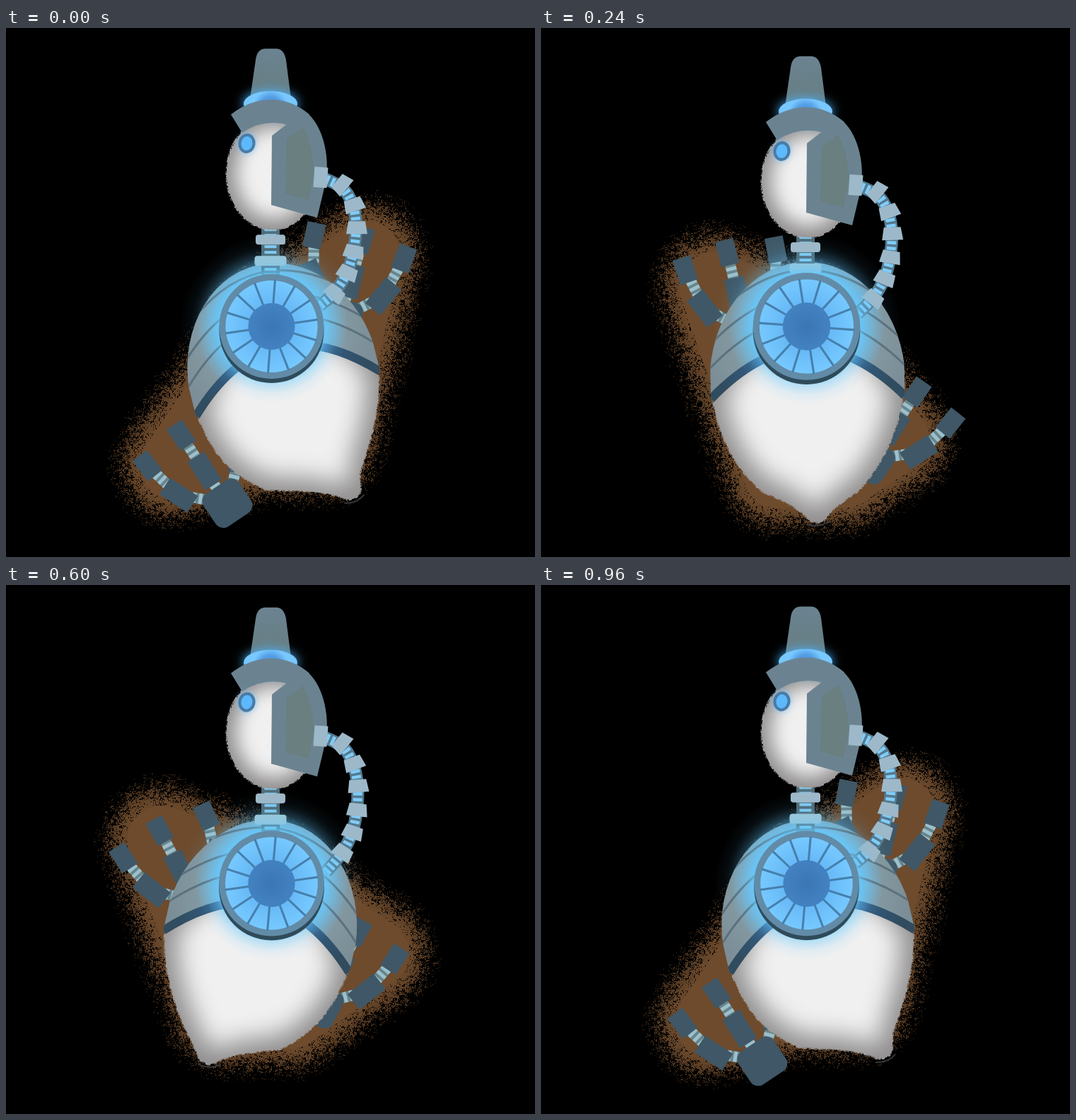
An HTML page with a canvas for the animation above (1000 ms loop, 748 by 748 pixels).

```html
<!DOCTYPE html>
<html>
<head>
<meta charset="utf-8">
<style>
  html, body { margin: 0; width: 100%; height: 100%; overflow: hidden; background: #000; }
  canvas { display: block; width: 100vw; height: 100vh; }
</style>
</head>
<body>
<canvas id="stage" width="748" height="748"></canvas>
<script>
const ctx = document.getElementById('stage').getContext('2d');
const LOOP = 1000, STEP = 40, RAD = Math.PI / 180, TAU = Math.PI * 2;
const STEEL = '#6b8391', PLATE = '#9db9c9', SLATE = '#3f5766', BROWN = [110, 75, 45];
const HUB = [375.5, 422];

// Keys: [time, ...values], smooth, periodic, without overshoot.
const bodyKeys = [          // tilt in degrees, tail offset
  [0, -13.7, 53], [160, -8.4, 36], [360, 10.5, -35], [520, 14.1, -53],
  [680, 9.5, -2], [800, -4.8, 27], [960, -13, 50]];
const clawKeys = [          // palm x, y, rotation
  [20, 472, 411, -18], [160, 479, 501, 0], [300, 450, 668, -1], [360, 438, 675, -2],
  [520, 437, 671, -1], [660, 449, 503, -14], [680, 451, 477, -17],
  [800, 463, 407, -22], [860, 468, 411, -22]];
const fuzzKeys = [          // right lobe x, y, left lobe x, y
  [0, 510, 322, 238, 618], [160, 492, 530, 248, 415], [360, 515, 622, 238, 328],
  [520, 512, 620, 240, 328], [680, 530, 390, 200, 430], [800, 510, 322, 232, 612],
  [960, 510, 322, 238, 618]];
const fingers = [           // block x, y, angle, tip x, y, angle
  [69, -10, 58, 114, -51, 39], [33, -45, 33, 67, -95, 35], [-16, -67, -5, 4, -123, 31]];
const tube = [              // x, y, sway x, sway y
  [445, 211, 0, 0], [475, 221, 0, 0], [492, 250, 0, 0], [496, 282, 2, 0],
  [492, 316, 5, 0], [483, 346, 8, 2], [465, 375, 12, 2], [443, 393, 10, 12]];

function sample(keys, t) {
  const n = keys.length;
  const key = i => {
    const k = keys[(i + n) % n].slice();
    k[0] += Math.floor(i / n) * LOOP;
    return k;
  };
  if (t < keys[0][0]) t += LOOP;
  let i = n - 1;
  while (keys[i][0] > t) i--;
  const [p, a, b, q] = [key(i - 1), key(i), key(i + 1), key(i + 2)];
  const d = b[0] - a[0], u = (t - a[0]) / d, v = 1 - u;
  const slope = (k, l, j) => (l[j] - k[j]) / (l[0] - k[0]);
  const blend = (m, n) => m * n > 0 ? 2 * m * n / (m + n) : 0;
  return a.slice(1).map((_, j) => {
    j++;
    const mid = slope(a, b, j);
    const ma = blend(slope(p, a, j), mid) * d, mb = blend(mid, slope(b, q, j)) * d;
    return a[j] * (1 + 2 * u) * v * v + ma * u * v * v + b[j] * u * u * (3 - 2 * u) - mb * u * u * v;
  });
}

// Noise tile, cut at several densities
const SIZE = 256;
let seed = 7;
const random = () => (seed = seed * 16807 % 2147483647) / 2147483647;
const noise = new Float32Array(SIZE * SIZE);
for (const cell of [4, 2, 1, 1]) {
  const w = SIZE / cell, grid = Array.from({ length: w * w }, random);
  for (let i = 0; i < noise.length; i++) {
    const x = i % SIZE / cell | 0, y = (i / SIZE | 0) / cell | 0;
    noise[i] += grid[y * w + x] / 4;
  }
}
function speckle(limit, rgb, shade = 1) {
  const c = document.createElement('canvas');
  c.width = c.height = SIZE;
  const g = c.getContext('2d'), img = g.createImageData(SIZE, SIZE);
  const color = rgb.map(v => v * shade);
  noise.forEach((v, i) => img.data.set([...color, v < limit ? 255 : 0], i * 4));
  g.putImageData(img, 0, 0);
  return ctx.createPattern(c, 'repeat');
}
const fuzz = Array.from({ length: 10 }, (_, i) => speckle(0.25 + 0.05 * i, BROWN, 0.5 + 0.05 * i));
const fluff = speckle(0.5, [165, 163, 162]);

function layer(draw) { ctx.save(); draw(); ctx.restore(); }
function fill(path, color) { ctx.fillStyle = color; ctx.fill(path); }
function line(path, color, width) { ctx.strokeStyle = color; ctx.lineWidth = width; ctx.stroke(path); }
function oval(x, y, rx, ry, turn = 0) {
  const p = new Path2D();
  p.ellipse(x, y, rx, ry, turn, 0, TAU);
  return p;
}
function block(x, y, w, h, turn, color, r = 0) {
  layer(() => {
    ctx.translate(x, y);
    ctx.rotate(turn);
    ctx.fillStyle = color;
    ctx.beginPath();
    ctx.roundRect(-w / 2, -h / 2, w, h, r);
    ctx.fill();
  });
}
function radial(x, y, r, ...stops) {
  const g = ctx.createRadialGradient(x, y, 0, x, y, r);
  stops.forEach(([at, color]) => g.addColorStop(at, color));
  return g;
}
// Soft white shape with grey rim
function puff(path, x, y, scale, blur) {
  line(path, fluff, 3);
  fill(path, '#908e8e');
  layer(() => {
    ctx.clip(path);
    ctx.filter = `blur(${blur}px)`;
    ctx.translate(x, y);
    ctx.scale(scale, scale);
    ctx.translate(-x, -y);
    fill(path, '#f0f0f0');
  });
}

function drawFuzz(t, tail) {
  const [rx, ry, lx, ly] = sample(fuzzKeys, t);
  const k = tail * 0.55, low = 640 - Math.abs(tail);
  const p = new Path2D(`M${lx} ${ly}L375 420L${rx} ${ry}L${420 + k} ${low}L${330 + k} ${low}Z`);
  ctx.lineJoin = 'round';
  fuzz.forEach((pattern, i) => line(p, pattern, 2 * (96 - 4.5 * i)));
  line(p, `rgb(${BROWN})`, 98);
  fill(p, `rgb(${BROWN})`);
}

function drawClaw(t, mirror) {
  const [x, y, turn] = sample(clawKeys, t);
  layer(() => {
    if (mirror) { ctx.translate(750, 0); ctx.scale(-1, 1); }
    ctx.translate(x, y);
    ctx.rotate(turn * RAD);
    for (const [bx, by, ba, tx, ty, ta] of fingers) {
      const bone = new Path2D(`M0 0L${bx} ${by}L${tx} ${ty}`);
      line(bone, '#67858c', 15);
      ctx.setLineDash([5, 4]);
      line(bone, '#9cc0cb', 15);
      ctx.setLineDash([]);
      block(bx, by, 28, 47, ba * RAD, SLATE);
      block(tx, ty, 26, 36, ta * RAD, SLATE);
    }
    block(0, 0, 60, 56, 35 * RAD, SLATE, 13);
  });
}

function bend(shift) {
  return `M-134 ${93 + shift}Q0 ${-42 + shift} 134 ${93 + shift}`;
}

function drawBody(tilt, tail, scale) {
  layer(() => {
    ctx.translate(...HUB);
    ctx.scale(scale, scale);
    ctx.rotate(tilt * RAD);
    const tip = 272 - Math.abs(tail) * 0.15, f = tail / 53;
    // One flank, from band to tail tip; s is its side
    const flank = s => [
      [s * 124, 150], [s * 100 - 12 * f, 196 + 10 * s * f], [s * 66 + 5 * f, 228 + 5 * s * f],
      [tail + s * 23 - 7 * f, 249 + 5 * s * f], [tail + s * 12, tip - 4]];
    const [l1, l2, l3, l4, l5] = flank(-1), [r1, r2, r3, r4, r5] = flank(1);
    const belly = new Path2D(`M-132 95C${l1} ${l2} ${l3}Q${l4} ${l5}Q${tail} ${tip + 4} ${r5}
      Q${r4} ${r3}C${r2} ${r1} 132 95Q0 -130 -132 95Z`);
    line(new Path2D(`M${tail - 12} ${tip + 3}Q${tail + 4} ${tip + 8} ${tail + 18} ${tip - 2}`), '#34383a', 2);
    puff(belly, 0, 105, 0.86, 17);

    const dome = oval(0, 75, 135, 164);
    layer(() => {
      ctx.clip(dome);
      fill(new Path2D(bend(4) + 'V-100H-134Z'),
        radial(0, 0, 150, [0.5, '#73bde6'], [0.72, '#82979f'], [1, '#7b8d96']));
      for (const s of [-38, -70, -103]) line(new Path2D(bend(s)), '#5c717d', 3);
      line(new Path2D(bend(5)), radial(0, 0, 160, [0.4, '#3b76b2'], [0.6, '#32597c'], [0.9, '#304c5e']), 12);
    });
  });
}

function drawGlow(radius, alpha) {
  const color = a => `rgba(100,200,252,${a * alpha})`;
  fill(oval(...HUB, radius, radius), radial(...HUB, radius,
    [0.66, color(1)], [0.76, color(0.45)], [0.88, color(0.13)], [1, color(0)]));
}

function drawNeck() {
  block(374, 316, 26, 70, 0, '#506e7a');
  for (let y = 285; y < 350; y += 8) block(374, y, 17, 4, 0, '#7fcaf2');
  block(374, 299, 42, 14, 0, PLATE, 4);
  block(374, 329, 45, 14, 0, '#9cc6d8', 4);
}

function drawTube(tilt, bob) {
  const sway = (13.7 + tilt) / 27.8;
  const pts = tube.map(([x, y, sx, sy], i) => [x + sx * sway, y + sy * sway + bob * (1 - i * 0.07)]);
  const p = new Path2D();
  p.moveTo(...pts[0]);
  pts.slice(1).forEach(([x, y], i, rest) => {
    const [nx, ny] = rest[i + 1] || [x, y];
    p.quadraticCurveTo(x, y, (x + nx) / 2, (y + ny) / 2);
  });
  line(p, '#55798e', 18);
  ctx.setLineDash([4.5, 3.5]);
  line(p, '#80ccf8', 13);
  ctx.setLineDash([]);
  pts.slice(0, -1).forEach(([x, y], i) => {
    if (!i) return block(x, y, 19, 29, 4 * RAD, PLATE);
    const a = pts[i - 1], b = pts[i + 1];
    layer(() => {
      ctx.translate(x, y);
      ctx.rotate(Math.atan2(b[1] - a[1], b[0] - a[0]));
      fill(new Path2D('M-9 -12L9 -15V15L-9 12Z'), PLATE);
    });
  });
}

function drawWheel(tilt, scale) {
  layer(() => {
    ctx.translate(...HUB);
    ctx.scale(scale, scale);
    fill(oval(0, 6, 74, 74), '#2f4b5a');
    fill(oval(0, 0, 74, 74), '#628ba7');
    fill(oval(0, 0, 65, 65), radial(0, 0, 65, [0.5, '#67b9f6'], [1, '#76c9ff']));
    ctx.rotate((tilt + 18) * RAD);
    for (let i = 0; i < 14; i++) {
      ctx.rotate(TAU / 14);
      line(new Path2D('M0 -30V-66'), '#467fac', 3);
    }
    fill(oval(0, 0, 33, 33), radial(0, 0, 33, [0, '#3b76b4'], [1, '#4382c2']));
  });
}

function drawHead() {
  puff(oval(377, 206, 65, 79), 384, 200, 0.82, 13);

  fill(new Path2D('M376 152L398 135L427 121C450 141 459 188 451 222L440 268L375 250Z'), STEEL);
  fill(new Path2D('M397 156L420 140Q434 162 435 205L428 243L395 234Z'), '#697f80');

  const crown = ctx.createLinearGradient(0, 30, 0, 95);
  crown.addColorStop(0, STEEL);
  crown.addColorStop(1, '#667d80');
  fill(new Path2D('M345 100L353 45Q355 29 367 29H382Q393 29 396 45L403 100Z'), crown);

  layer(() => {
    ctx.shadowColor = '#4cb4ff';
    ctx.shadowBlur = 16;
    fill(oval(374, 107, 38, 18), radial(374, 112, 38, [0, '#3f86d2'], [0.4, '#559fe6'], [0.65, '#78c8ff']));
  });
  fill(new Path2D('M318 122Q345 101 375 101Q404 101 429 122L423 134L400 137Q364 127 334 148Z'), STEEL);

  layer(() => {
    ctx.shadowColor = 'rgba(110,195,255,.8)';
    ctx.shadowBlur = 8;
    fill(oval(340.5, 163, 12, 14, 0.15), '#4a7ba5');
  });
  fill(oval(340.5, 163, 8, 10, 0.15), '#5cb9fc');
}

function draw(t) {
  const lift = Math.sin(Math.PI * (t - 20) / 500) ** 2;
  const bob = 11.5 * lift, scale = 1 + 0.025 * lift;
  const [tilt, tail] = sample(bodyKeys, t);

  ctx.fillStyle = '#000';
  ctx.fillRect(0, 0, 748, 748);
  drawFuzz(t, tail);
  drawClaw(t, false);
  drawClaw((t + 500) % LOOP, true);
  drawGlow(130 * scale, 0.4);
  drawBody(tilt, tail, scale);
  layer(() => { ctx.translate(0, bob); drawNeck(); drawHead(); });
  drawTube(tilt, bob);
  drawGlow(108 * scale, 0.85);
  drawWheel(tilt, scale);
}

const start = performance.now();
let last = -1;
function frame() {
  const t = Math.floor((performance.now() - start) / STEP) * STEP % LOOP;
  if (t !== last) draw(last = t);
  requestAnimationFrame(frame);
}
frame();
</script>
</body>
</html>
```
